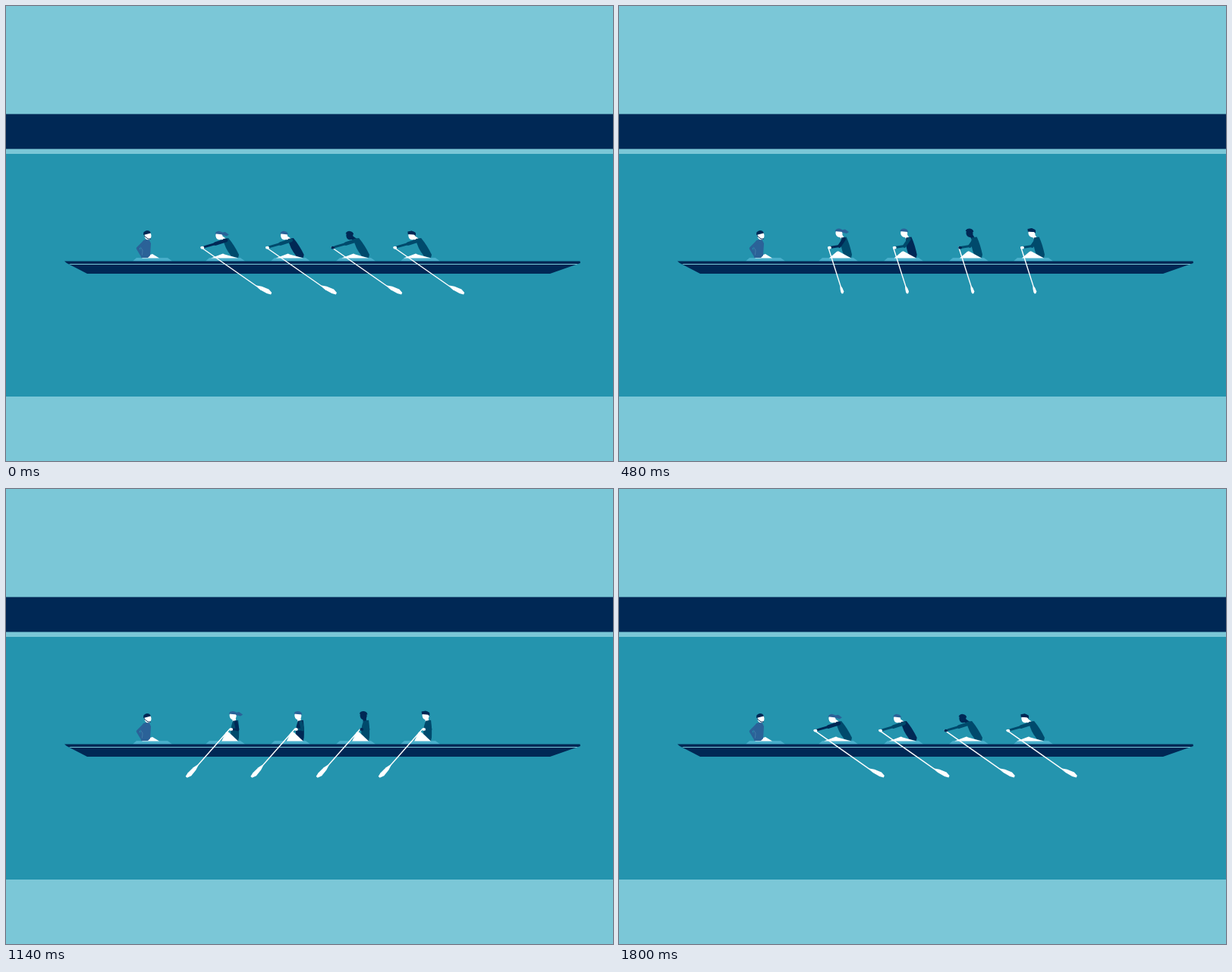
An HTML page with a canvas for the animation above (1830 ms loop, 800x600 px).

```html
<!DOCTYPE html>
<html lang="en">
<head>
<meta charset="utf-8">
<title>Rowing crew</title>
<style>
  html, body { margin: 0; width: 100%; height: 100%; overflow: hidden; background: #7bc7d7; }
  canvas { display: block; }
</style>
</head>
<body>
<canvas id="stage" width="800" height="600"></canvas>
<script>
const ctx = document.getElementById('stage').getContext('2d');
const LOOP = 1830, FINISH = 1010, STEP = 30;
const SKY = '#7bc7d7', WATER = '#2494ae', NAVY = '#002855', TEAL = '#004a6c',
      BLUE = '#2b6298', SEAT = '#48aeca', WHITE = '#fff';
const HIP = { x: 302, y: 331 };

const crew = [
  { dx: 0, seat: 0, skin: WHITE, hair: BLUE, top: TEAL, sleeve: NAVY, tail: true },
  { dx: 85.7, seat: 86, skin: WHITE, hair: BLUE, top: NAVY, sleeve: TEAL },
  { dx: 172, seat: 172, skin: NAVY, hair: NAVY, top: TEAL, sleeve: TEAL },
  { dx: 254, seat: 257, skin: WHITE, hair: NAVY, top: TEAL, sleeve: TEAL, quiff: true }
];

// A point at a distance above the hip, leaning forward by an angle in degrees.
function lean(dist, deg) {
  const a = deg * Math.PI / 180;
  return { x: HIP.x - dist * Math.sin(a), y: HIP.y - dist * Math.cos(a) };
}

// Joints of the first rower. reach: 1 at the catch, 0 at the finish;
// pull peaks during the drive, lift during the recovery.
function poseAt(t) {
  const phase = Math.PI * (t < FINISH ? t / FINISH : 1 + (t - FINISH) / (LOOP - FINISH));
  const reach = (1 + Math.cos(phase)) / 2;
  const pull = Math.max(0, Math.sin(phase));
  const lift = Math.min(0, Math.sin(phase)) ** 2;
  const angle = 2 + 34 * reach + 4 * lift;
  return {
    head: lean(33 + 3 * reach, angle),
    shoulder: lean(23.2 + 1.8 * reach, angle - 7.5),
    elbow: { x: 307.5 - 31.5 * reach - 2 * lift, y: 317 - 3.5 * reach ** 3 },
    hand: { x: 298.7 - 40.7 * reach - 1.5 * lift, y: 318.7 - 7.7 * lift },
    knee: { x: 292.3 - 6.3 * reach, y: 319.5 + 7 * reach },
    toe: 285 - 15 * reach,
    tip: { x: 231 + 119 * reach, y: 380 - 1.5 * reach + 2 * lift },
    blade: { length: 22 - 12 * pull, width: 6 - 2 * pull, bend: -.14 * reach ** 4 }
  };
}

function rect(color, x, y, w, h) {
  ctx.fillStyle = color;
  ctx.fillRect(x, y, w, h);
}

function poly(color, ...pts) {
  ctx.fillStyle = color;
  ctx.beginPath();
  for (let i = 0; i < pts.length; i += 2) ctx.lineTo(pts[i], pts[i + 1]);
  ctx.fill();
}

function oval(color, x, y, rx, ry, turn = 0, from = 0) {
  ctx.fillStyle = color;
  ctx.beginPath();
  ctx.ellipse(x, y, rx, ry, turn, from, 2 * Math.PI);
  ctx.fill();
}

function line(color, width, ...pts) {
  ctx.strokeStyle = color;
  ctx.lineWidth = width;
  ctx.beginPath();
  for (let i = 0; i < pts.length; i += 2) ctx.lineTo(pts[i], pts[i + 1]);
  ctx.stroke();
}

function drawScene() {
  rect(SKY, 0, 0, 800, 600);
  rect(NAVY, 0, 142.5, 800, 46);
  rect(WATER, 0, 195, 800, 320);
}

function drawSeat(x) {
  poly(SEAT, x, 336.5, x + 5, 332, x + 46, 332, x + 52, 336.5);
}

function drawBoat() {
  poly(NAVY, 77, 336.5, 756.5, 336.5, 757, 339, 717, 353, 107, 353, 80, 339);
  poly(SKY, 83, 340, 754, 340, 752, 341, 85, 341);
}

function drawCox() {
  drawSeat(167);
  poly(WHITE, 179, 332.5, 184, 330, 193, 327, 202, 332.5);
  poly(BLUE, 181, 309, 188, 307, 191, 313, 190, 329, 187, 332, 178, 332, 177, 320);
  line(BLUE, 3.5, 182, 311, 173.5, 319.5, 178.5, 328);
  line('#4780ad', .8, 178, 319, 180, 322, 179.5, 328);
  oval(WHITE, 187, 303, 4.5, 5.3);
  oval(NAVY, 186, 300.7, 5, 4.7, -.25, Math.PI);
  line(NAVY, 1, 182, 303, 187, 307, 190.5, 307);
}

function drawHead(r, { head: { x, y }, shoulder }) {
  line(r.skin, 4.5, x + 1, y + 2, shoulder.x - 2, shoulder.y - 1);
  oval(r.skin, x, y + 1, 4.5, 5.5, -.15);
  oval(r.hair, x, y - 1, 5.3, 4, .1, Math.PI);
  if (r.tail) poly(r.hair, x + 3, y - 3, x + 8, y - 4, x + 13, y - .5, x + 10, y + 1.5, x + 4, y);
  if (r.quiff) {
    poly(r.hair, x - 5.5, y - 4.5, x, y - 5.5, x + 5, y - 3, x + 5, y + 1.5, x + 3, y - .5, x - 5, y - 1);
  }
}

function drawTorso(r, { shoulder: { x, y } }) {
  ctx.fillStyle = r.top;
  ctx.beginPath();
  ctx.moveTo(x - 4, y - 2);
  ctx.lineTo(x + 3, y - 3);
  ctx.quadraticCurveTo((x + 312) / 2, (y + 322) / 2, 307, 328);
  ctx.lineTo(306, 332);
  ctx.lineTo(297, 330);
  ctx.quadraticCurveTo((x + 286) / 2, (y + 329) / 2, x - 4, y - 2);
  ctx.fill();
}

function drawThigh({ toe, knee: { x, y } }) {
  poly(WHITE, toe, 332.5, x - 2, y + .8, x, y, x + 2, y + 1, 306, 332.5);
}

function drawOar({ hand, tip, blade }) {
  const { length: n, width: w, bend } = blade;
  const angle = Math.atan2(tip.y - hand.y, tip.x - hand.x) + bend;
  ctx.save();
  const neck = { x: tip.x - n * Math.cos(angle), y: tip.y - n * Math.sin(angle) };
  line(WHITE, 1.4, hand.x - 1, hand.y - .5, neck.x, neck.y);
  ctx.translate(neck.x, neck.y);
  ctx.rotate(angle);
  poly(WHITE, 0, -.7, n * .3, -w * .4, n * .75, -w / 2, n, -w * .1,
       n, w * .35, n * .75, w / 2, n * .3, w * .4, 0, .7);
  ctx.restore();
}

function drawArm(r, { shoulder, elbow, hand }) {
  const wristX = elbow.x + (hand.x - elbow.x) * .8;
  const wristY = elbow.y + (hand.y - elbow.y) * .8;
  line(r.sleeve, 3, elbow.x, elbow.y, wristX, wristY);
  line(r.sleeve, 4.6, shoulder.x, shoulder.y, elbow.x, elbow.y);
  oval(r.skin, hand.x + .8, hand.y, 2.4, 1.9);
}

function drawRower(r, pose) {
  ctx.save();
  ctx.translate(r.dx, 0);
  drawHead(r, pose);
  drawTorso(r, pose);
  drawThigh(pose);
  drawOar(pose);
  drawArm(r, pose);
  ctx.restore();
}

function frame(now) {
  const pose = poseAt(Math.floor(now % LOOP / STEP) * STEP);
  drawScene();
  crew.forEach(r => drawSeat(263 + r.seat));
  drawCox();
  drawBoat();
  crew.forEach(r => drawRower(r, pose));
  requestAnimationFrame(frame);
}

ctx.lineCap = ctx.lineJoin = 'round';
requestAnimationFrame(frame);
</script>
</body>
</html>
```
